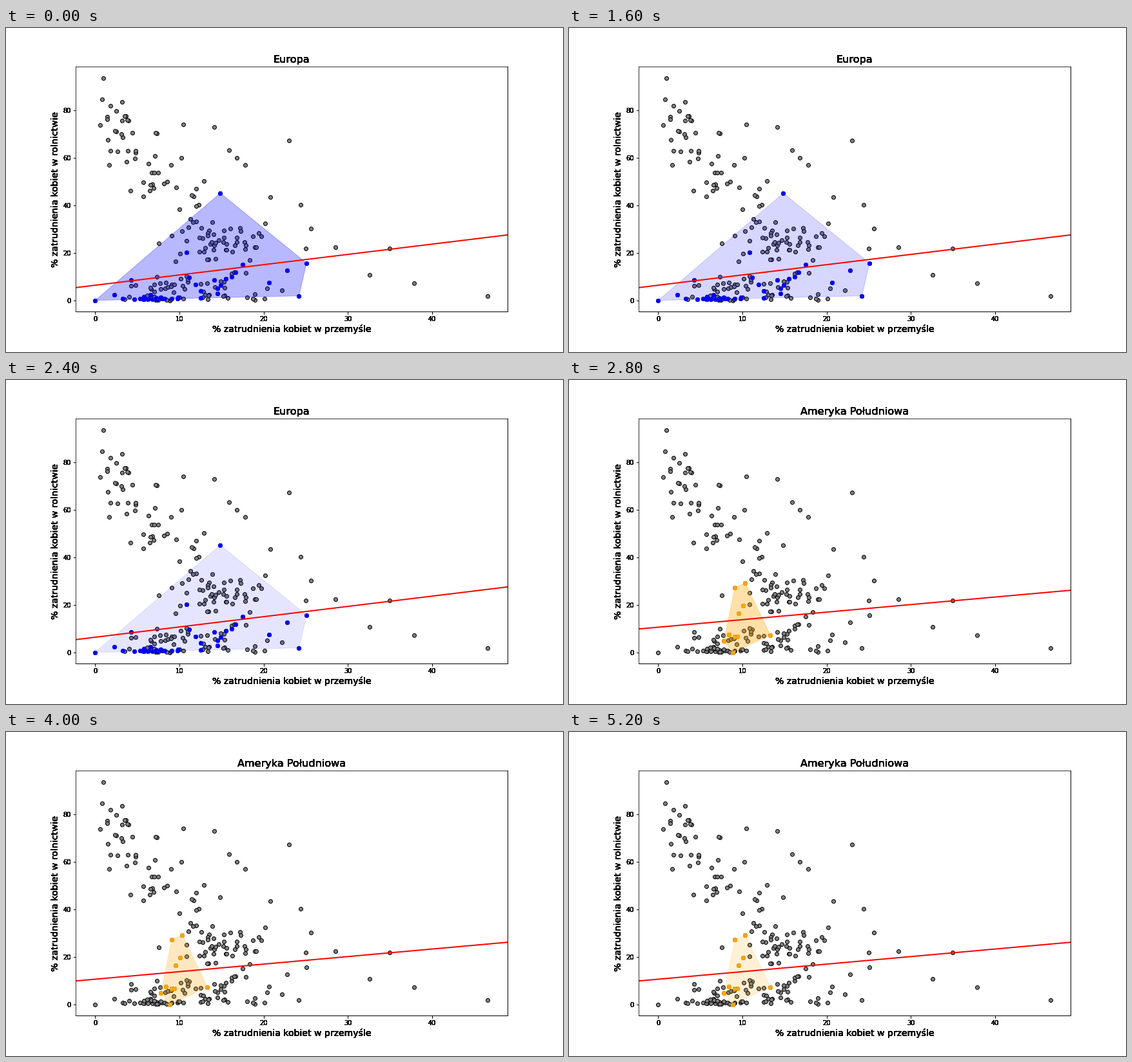
Animation of 864x504 px, one loop 5.6 s. Source, as a matplotlib script:

```python
import numpy as np
import matplotlib.pyplot as plt
from matplotlib.animation import FuncAnimation

W, H, DPI = 864, 504, 72
LAYERS = 10          # stacked lettering, makes soft edges solid
STEPS = 7            # fade steps per region
FADE = 0.03          # opacity lost per step

plt.rcParams["font.family"] = "DejaVu Sans"
rng = np.random.default_rng(7)


def inside(corners, count, weights):
    """Random dots within a convex outline, pulled towards heavy corners."""
    return rng.dirichlet(weights, count) @ corners


def rural(count):
    x = rng.uniform(1, 13, count)
    return np.column_stack([x, 76 - 2.6 * x + rng.normal(0, 10, count)])


def mixed(count):
    return np.column_stack([rng.triangular(5, 14, 25.5, count),
                            rng.triangular(13, 25, 36, count)])


def urban(count):
    return np.column_stack([rng.triangular(2, 9, 24, count),
                            12 * rng.beta(0.7, 1.3, count)])


# Outlines run counter-clockwise
europe_hull = np.array([(0, 0), (24.2, 1.9), (25.1, 15.7), (14.86, 45.2)])
america_hull = np.array([(8.88, 0), (13.33, 7.3), (10.34, 29.2),
                         (9.11, 27.3), (7.81, 4.9)])
outliers = [(1, 93.6), (0.8, 84.7), (0.6, 73.9), (14.1, 73.1), (23, 67.4),
            (15.9, 63.3), (16.8, 60.1), (17.8, 57.1), (20.8, 43.6),
            (24.4, 40.3), (25.6, 30.3), (28.5, 22.5), (35, 21.9),
            (32.6, 10.8), (37.9, 7.3), (46.6, 1.9)]

europe = np.vstack([europe_hull,
                    inside(europe_hull, 18, (13, 6.5, 0.15, 0.15)),
                    inside(europe_hull, 17, (2, 2, 0.8, 0.6))])
america = np.vstack([america_hull,
                     inside(america_hull, 5, (1, 1, 0.5, 0.5, 2))])
dots = np.vstack([europe, america, outliers, rural(56), mixed(45), urban(55)])

# name, colour, outline, dots, trend slope and intercept, starting opacity
REGIONS = [
    ("Europa", "blue", europe_hull, europe, (0.4327, 6.39), 0.28),
    ("Ameryka Południowa", "orange", america_hull, america,
     (0.3177, 10.61), 0.34)]


def add_axes(z):
    ax = fig.add_axes([0.125, 0.125, 0.775, 0.755], zorder=z)
    ax.set_xlim(-2.33, 48.95)
    ax.set_ylim(-4.69, 98.4)
    ax.set_xlabel("% zatrudnienia kobiet w przemyśle", fontsize=14)
    ax.set_ylabel("% zatrudnienia kobiet w rolnictwie", fontsize=14)
    return ax


fig = plt.figure(figsize=(W / DPI, H / DPI), dpi=DPI, facecolor="white")
layers = [add_axes(z) for z in range(LAYERS)]
ax = layers[-1]
ax.scatter(*dots.T, s=36, c="gray", edgecolors="black", linewidths=1)

scenes = []
for name, color, outline, points, (slope, base), alpha in REGIONS:
    area, = ax.fill(*outline.T, color=color, linewidth=1)
    marks = ax.scatter(*points.T, s=36, c=color, linewidths=1)
    xs = np.array(ax.get_xlim())
    trend, = ax.plot(xs, slope * xs + base, color="red", linewidth=2)
    scenes.append((name, area, marks, trend, alpha))


def update(i):
    current, step = divmod(i, STEPS)
    for k, (name, area, marks, trend, alpha) in enumerate(scenes):
        for artist in (area, marks, trend):
            artist.set_visible(k == current)
        if k == current:
            area.set_alpha(alpha - FADE * step)
            for layer in layers:
                layer.set_title(name, fontsize=16)
    return []


anim = FuncAnimation(fig, update, frames=STEPS * len(REGIONS), interval=400,
                     repeat=True, repeat_delay=0, blit=False)
plt.show()
```
